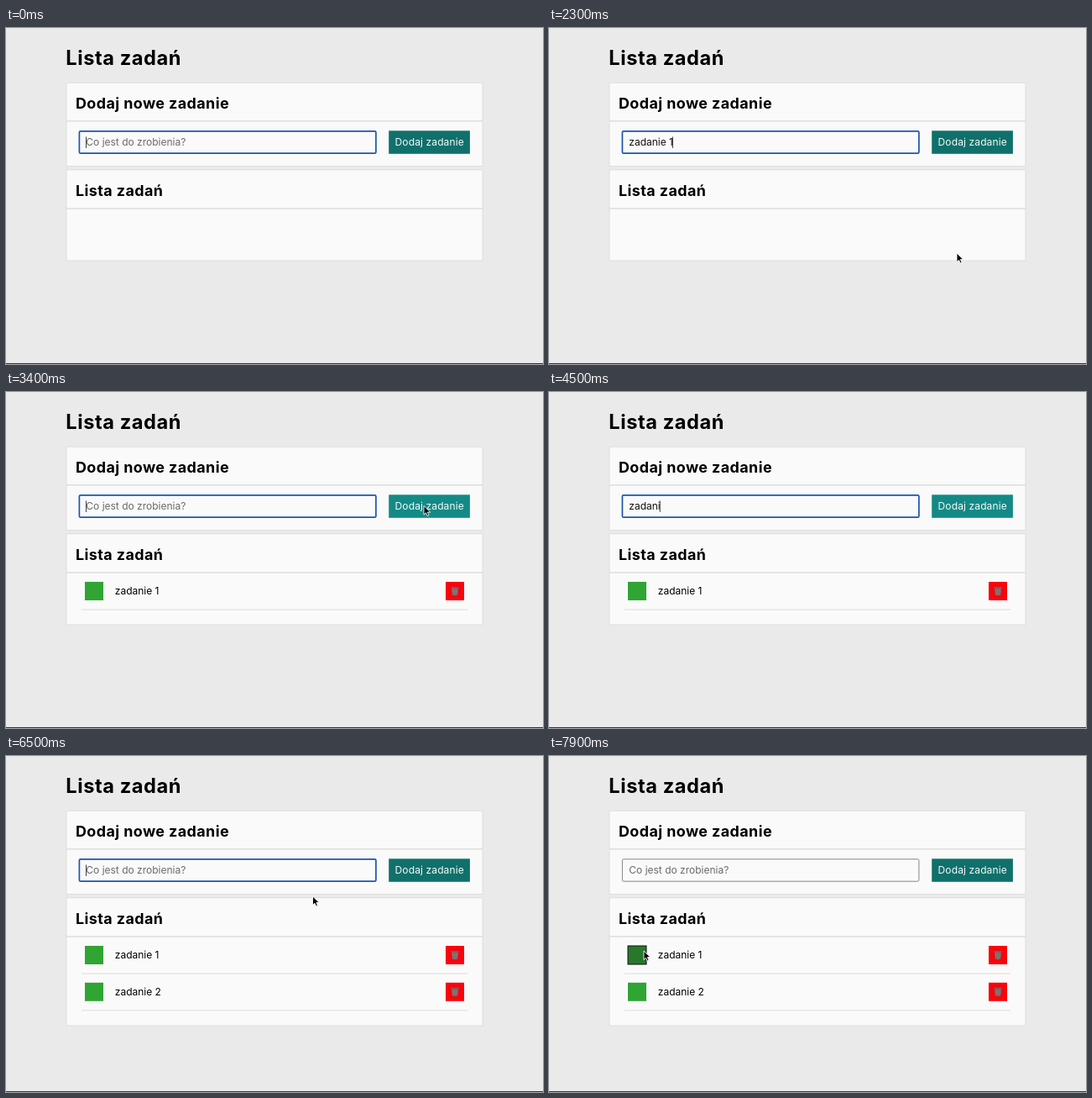
These frames come from a looping animation (640 by 400 pixels, 8 s). An HTML page:

```html
<!DOCTYPE html>
<html lang="pl">
<head>
<meta charset="utf-8">
<title>Lista zadań</title>
<style>
  html, body { margin: 0; width: 100%; height: 100%; overflow: hidden; background: #eaeaea; }
  svg { display: block; width: 640px; height: 400px; }
  text { font: 12px Inter, sans-serif; white-space: pre; }
  .title, .heading { font-weight: 700; letter-spacing: .024em; }
  .title { font-size: 23.6px; }
  .heading { font-size: 17.9px; }
  .panel { fill: #fafafa; stroke: #dedede; }
  .divider { fill: #dedede; }
</style>
</head>
<body>
<svg viewBox="0 0 640 400">
  <defs>
    <g id="row">
      <rect x="524" y="226" width="22" height="22" fill="#f8040c"/>
      <g fill="#9a8585" stroke="#6d5555" stroke-width=".7">
        <path d="M531.3 234h7.4l-.8 8h-5.8z"/>
        <path d="M530.6 232.4h8.8v1.4h-8.8zM533.4 234.5v7M535 234.5v7M536.6 234.5v7"/>
      </g>
      <rect x="90" y="258.6" width="460" height="1" fill="#dcdcdc"/>
    </g>
  </defs>
  <rect width="640" height="400" fill="#eaeaea"/>
  <rect y="399" width="640" height="1" fill="#263d26"/>
  <text class="title" x="71.3" y="44">Lista zadań</text>

  <rect class="panel" x="72" y="65.2" width="496" height="99.3"/>
  <rect class="divider" x="72" y="110" width="496" height="1.5"/>
  <text class="heading" x="83" y="95.8">Dodaj nowe zadanie</text>
  <rect id="field" x="87.4" y="122.8" width="353.5" height="26.4" rx="1.5" fill="#fafafa"/>
  <text id="entry" x="95.3" y="140"></text>
  <rect id="caret" y="129.5" width="1" height="13.5" fill="#444"/>
  <rect id="add" x="456.2" y="122.3" width="96.7" height="27.5"/>
  <text x="504.7" y="140" text-anchor="middle" letter-spacing=".12" fill="#f4fafa">Dodaj zadanie</text>

  <rect id="list" class="panel" x="72" y="168.8" width="496"/>
  <rect class="divider" x="72" y="214.2" width="496" height="1.5"/>
  <text class="heading" x="83" y="199.8">Lista zadań</text>
  <g id="task1">
    <use href="#row"/>
    <rect id="done" x="94" y="226" width="22" height="22"/>
    <text x="129.8" y="241.3">zadanie 1</text>
  </g>
  <g id="task2" transform="translate(0 43.8)">
    <use href="#row"/>
    <rect x="94" y="226" width="22" height="22" fill="#30a533"/>
    <text x="129.8" y="241.3">zadanie 2</text>
  </g>
  <path id="pointer" d="M0 0V10.6L2.5 8.3L4.2 12L6 11.2L4.4 7.6H7.8Z" fill="#000" stroke="#fff" stroke-width=".9"/>
</svg>
<script>
const $ = id => document.getElementById(id);
const set = (id, attrs) => {
  for (const name in attrs) $(id).setAttribute(name, attrs[name]);
};

const LOOP = 8000, BLINK = 550;
const ADD_1 = 3000, ADD_2 = 6000, PRESS = 7850;

// One time per keystroke, and the moment the field is emptied
const entries = [
  { text: "zadanie 1", keys: [100, 250, 400, 500, 650, 750, 840, 1600, 1900], sent: ADD_1 },
  { text: "zadanie 2", keys: [3600, 3700, 3900, 4100, 4300, 4500, 4700, 4900, 5100], sent: ADD_2 }
];

// Each stroke: [time, x, y]; the pointer hides between strokes while typing
const strokes = [
  [[2050, 478, 358], [2300, 486, 268], [2800, 498, 135.5], [3600, 498, 135.5]],
  [[5700, 498, 135.5], [6100, 498, 136.5], [6500, 365.5, 167], [7100, 200, 218],
   [7650, 113, 232], [LOOP, 113, 232]]
];

function pointerAt(t) {
  const path = strokes.find(s => t >= s[0][0] && t < s[s.length - 1][0]);
  if (!path) return null;
  const i = path.findIndex(p => p[0] > t);
  const [t0, x0, y0] = path[i - 1], [t1, x1, y1] = path[i];
  const u = (t - t0) / (t1 - t0), k = u * u * (3 - 2 * u);
  return [x0 + (x1 - x0) * k, y0 + (y1 - y0) * k];
}

function typedAt(t) {
  let text = "", lastEdit = 0;
  for (const { text: full, keys, sent } of entries) {
    const count = keys.filter(k => k <= t).length;
    if (count) {
      text = full.slice(0, count);
      lastEdit = keys[count - 1];
    }
    if (t >= sent) {
      text = "";
      lastEdit = sent;
    }
  }
  return { text, lastEdit };
}

const inside = (p, x, y, w, h) =>
  p && p[0] >= x && p[0] <= x + w && p[1] >= y && p[1] <= y + h;

function draw(t) {
  const { text, lastEdit } = typedAt(t);
  const focused = t < PRESS;
  const pointer = pointerAt(t);

  set("field", { stroke: focused ? "#1c56ad" : "#858585", "stroke-width": focused ? 1.7 : 1 });
  $("entry").textContent = text || "Co jest do zrobienia?";
  set("entry", { fill: text ? "#111" : "#6a6a6a" });
  const caretX = 95 + (text ? $("entry").getComputedTextLength() - .7 : 0);
  const caretOn = focused && Math.floor((t - lastEdit) / BLINK) % 2 === 0;
  set("caret", { x: caretX, opacity: +caretOn });

  // A hidden pointer still rests on the button
  const hovered = inside(pointer, 456, 122, 97, 28) || (t >= 3600 && t < 5700);
  set("add", { fill: hovered ? "#138a85" : "#10706b" });

  set("list", { height: t >= ADD_2 ? 152.2 : 108.2 });
  set("task1", { visibility: t >= ADD_1 ? "visible" : "hidden" });
  set("task2", { visibility: t >= ADD_2 ? "visible" : "hidden" });
  set("done", {
    fill: inside(pointer, 94, 226, 22, 22) ? "#28782c" : "#30a533",
    stroke: focused ? "none" : "#111"
  });

  set("pointer", { visibility: pointer ? "visible" : "hidden" });
  if (pointer) set("pointer", { transform: `translate(${pointer})` });
}

const start = performance.now();
function tick() {
  draw((performance.now() - start) % LOOP);
  requestAnimationFrame(tick);
}
tick();
</script>
</body>
</html>
```
